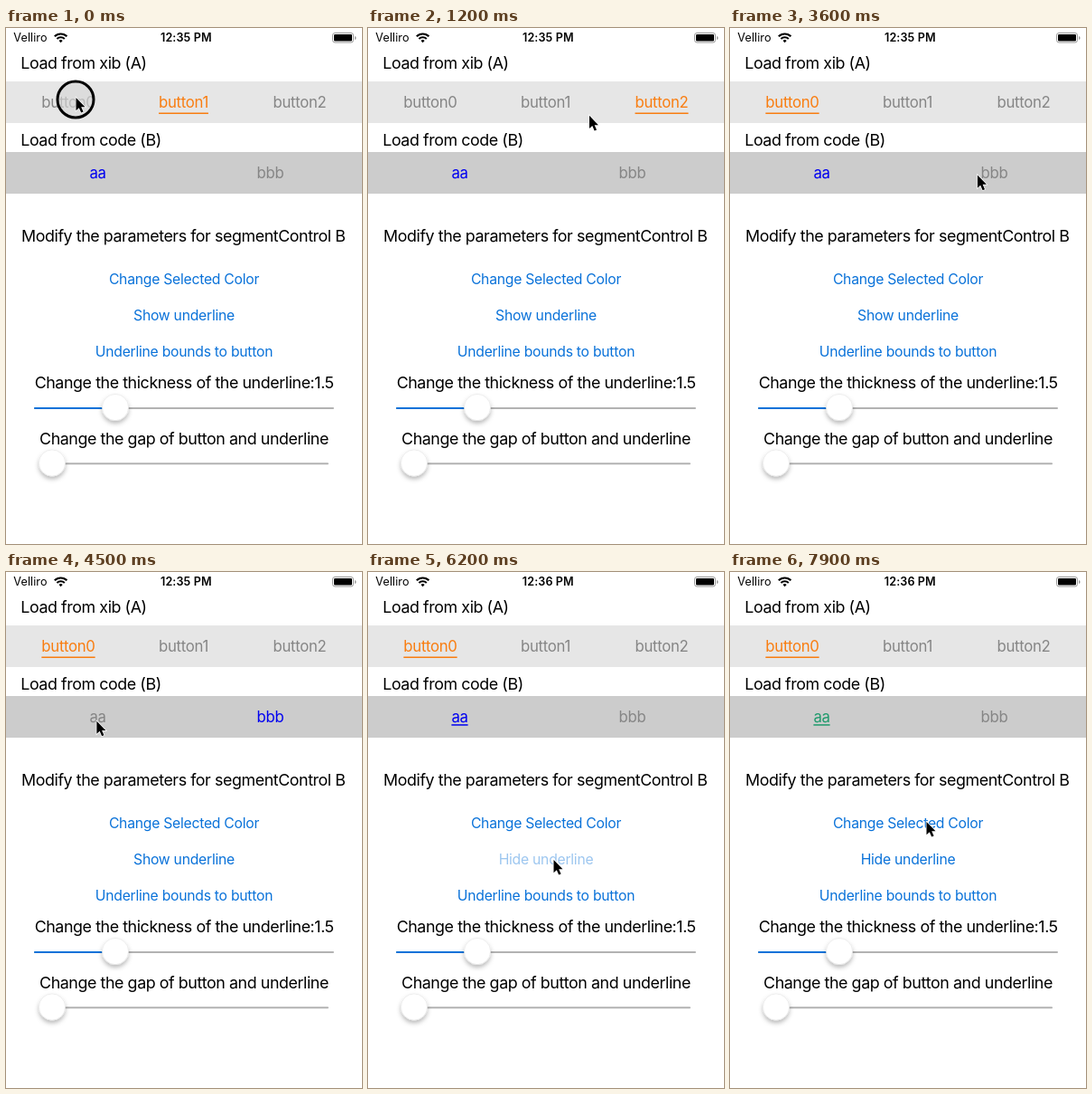
Recreate the animation shown at these times as an HTML page. Size 394 by 570 pixels, loop 8000 ms.

```html
<!DOCTYPE html>
<html lang="en">
<head>
<meta charset="utf-8">
<title>Segment control demo</title>
<style>
html, body { margin: 0; width: 100%; height: 100%; overflow: hidden; background: #fff; }
svg { display: block; width: 394px; height: 570px; }
text { font: 17.86px Inter, "Open Sans", sans-serif; font-optical-sizing: none; letter-spacing: -.44px; text-anchor: middle; }
.seg text { font-size: 16.8px; letter-spacing: -.33px; fill: #858585; }
.link { font-size: 15.76px; letter-spacing: -.27px; fill: #0a72d9; }
.status { font-size: 12.6px; letter-spacing: .1px; }
</style>
</head>
<body>
<svg viewBox="0 0 394 570">
  <defs>
    <filter id="soft" x="-50%" y="-50%" width="200%" height="200%">
      <feDropShadow dx="0" dy="3" stdDeviation="2.5" flood-opacity=".28"/>
    </filter>
  </defs>

  <text class="status" x="27" y="15">Velliro</text>
  <g fill="none" stroke="#000" stroke-width="2.1">
    <path d="M53.8 9.3a9.6 9.6 0 0 1 13.6 0M56.4 12a6 6 0 0 1 8.4 0"/>
    <path d="M60.6 16.2l-2.1-2.2a3 3 0 0 1 4.2 0z" fill="#000" stroke="none"/>
  </g>
  <text class="status" id="clock" x="199.3" y="15.3" style="font-weight:600"></text>
  <rect x="361.5" y="5.5" width="23" height="10.5" rx="2.6" fill="none" stroke="#999"/>
  <rect x="363" y="7" width="20" height="7.5" rx="1.3"/>
  <path d="M386 9v4q1.6-.6 1.6-2t-1.6-2z" fill="#999"/>

  <rect y="59" width="394" height="46" fill="#e6e6e6"/>
  <rect y="137" width="394" height="46" fill="#ccc"/>
  <text x="86" y="45">Load from xib (A)</text>
  <text x="94" y="130">Load from code (B)</text>
  <g class="seg">
    <text x="69" y="87.7">button0</text>
    <text x="196.5" y="87.7">button1</text>
    <text x="325" y="87.7">button2</text>
    <text x="101.5" y="165.7">aa</text>
    <text x="292.5" y="165.7">bbb</text>
  </g>
  <rect id="lineA" y="93.5" height="1.5"/>
  <rect id="lineB" y="168.2" height="1.5"/>

  <text x="196.3" y="236">Modify the parameters for segmentControl B</text>
  <text class="link" id="color" x="197" y="282.5">Change Selected Color</text>
  <text class="link" id="toggle" x="197" y="322.5"></text>
  <text class="link" x="197" y="362.5">Underline bounds to button</text>
  <text x="197.2" y="398">Change the thickness of the underline:1.5</text>
  <text x="197" y="459.7">Change the gap of button and underline</text>

  <g fill="#b2b2b2">
    <rect x="31" y="419" width="332" height="2" rx="1"/>
    <rect x="37" y="480.3" width="320" height="2" rx="1"/>
    <rect x="31" y="419" width="90" height="2" rx="1" fill="#0a72d9"/>
  </g>
  <g fill="#fff" stroke="#e2e2e2" stroke-width=".6" filter="url(#soft)">
    <circle cx="121" cy="419" r="14.6"/>
    <circle cx="51" cy="480.5" r="14.6"/>
  </g>

  <g id="cursor">
    <circle id="ring" cy="2" r="20" fill="#d7d7d7" fill-opacity=".65" stroke="#000" stroke-width="3"/>
    <path d="M.5 0v14.2l3.3-3 2.4 5.4 2.4-1-2.4-5.3h4.3z" stroke="#fff" stroke-width="1.4" paint-order="stroke"/>
  </g>
</svg>
<script>
const $ = id => document.getElementById(id);
const segs = [...document.querySelectorAll('.seg text')];
const HOLD = 100, REST = 200, FADE = 400, SAG = 14;

// each click: time, pointer position, segment index or link id
const clicks = [
  [0, 77, 77, 0], [800, 322, 86, 2], [1700, 200, 83, 1], [2700, 72, 102, 0],
  [3900, 279, 163, 4], [4700, 93, 163, 3], [6000, 205, 318, 'toggle'], [7000, 217, 276, 'color']
].map(([time, x, y, hit]) => ({ time, x, y, hit }));

// the pointer rests after a click, then eases out to the next on a slight arc
function pointAt(t) {
  const i = clicks.findLastIndex(c => c.time <= t);
  const from = clicks[i], to = clicks[i + 1] || from;
  const start = from.time + REST;
  if (to === from || t < start) return [from.x, from.y];
  const k = 1 - (1 - (t - start) / (to.time - start)) ** 3;
  return [from.x + (to.x - from.x) * k, from.y + (to.y - from.y) * k + SAG * Math.sin(Math.PI * k)];
}

// a link dims while pressed and fades back after release
function linkAlpha(t, id) {
  const since = t - clicks.find(c => c.hit === id).time;
  return since < 0 ? 1 : Math.min(1, .2 + .8 * Math.max(0, since - HOLD) / FADE);
}

function select(seg, line, color, underlined) {
  const box = seg.getBBox();
  seg.style.fill = color;
  line.setAttribute('x', box.x);
  line.setAttribute('width', box.width);
  line.setAttribute('fill', underlined ? color : 'none');
}

function draw(now) {
  const t = Math.floor(now % 8000 / 100) * 100;
  const done = clicks.filter(c => t >= c.time + HOLD).map(c => c.hit);
  const a = done.findLast(hit => hit < 3) ?? 1;
  const b = done.findLast(hit => hit >= 3) ?? 3;
  const underlined = done.includes('toggle');

  segs.forEach(s => s.style.fill = '');
  select(segs[a], $('lineA'), '#f97d10', true);
  select(segs[b], $('lineB'), done.includes('color') ? '#1f9a6c' : '#0000f0', underlined);
  $('clock').textContent = t < 5200 ? '12:35 PM' : '12:36 PM';
  $('toggle').textContent = underlined ? 'Hide underline' : 'Show underline';
  for (const id of ['toggle', 'color']) $(id).style.opacity = linkAlpha(t, id);
  $('cursor').setAttribute('transform', `translate(${pointAt(t)})`);
  $('ring').style.display = clicks.some(c => t >= c.time && t < c.time + HOLD) ? '' : 'none';
  requestAnimationFrame(draw);
}
draw(performance.now());
</script>
</body>
</html>
```
